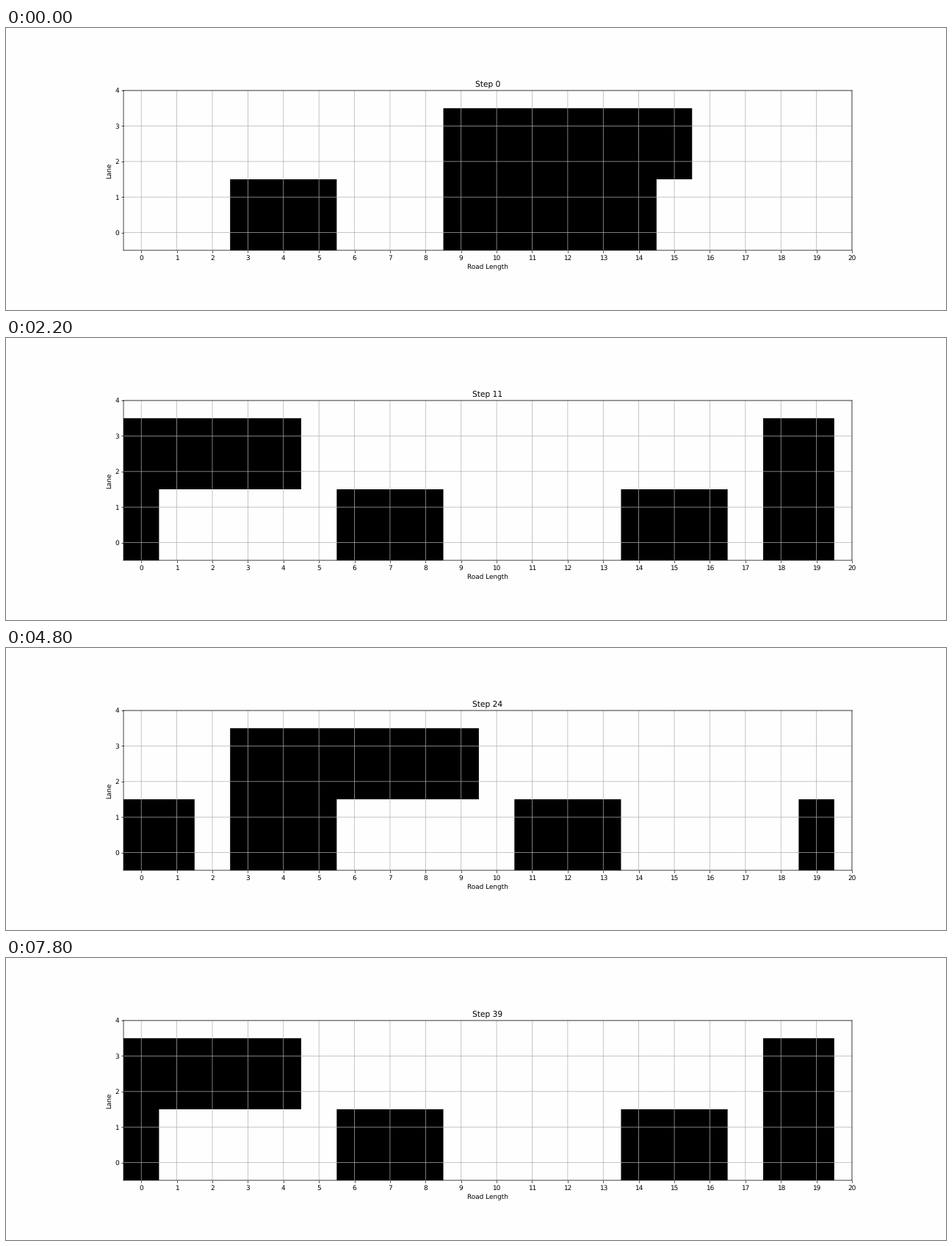
Recreate the animation shown at these times as a matplotlib script. Size 1280x384 px, loop 8000 ms.

```python
import numpy as np
import matplotlib.pyplot as plt
from matplotlib.animation import FuncAnimation
from matplotlib.patches import PathPatch
from matplotlib.path import Path

ROAD, LANES = 20, 4
STEPS, INTERVAL = 40, 200
V_MAX = 5
PAPER = "#fefefe"
CELL = np.array([(0, 0), (1, 0), (1, 1), (0, 1), (0, 0)]) - 0.5

# Each track is a two-lane strip: (lowest lane, [(start cell, length, speed), ...])
TRACKS = [
    (0, [(3, 3, 3), (9, 3, 1), (12, 3, 3)]),
    (2, [(9, 7, 1)]),
]


def advance(cars):
    """Speed up by one, but never run into the car ahead on the ring road."""
    moved = []
    for i, (pos, length, speed) in enumerate(cars):
        ahead, _, ahead_speed = cars[(i + 1) % len(cars)]
        gap = (ahead - pos - 1) % ROAD + 1 - length
        speed = min(speed + 1, V_MAX, gap + ahead_speed)
        moved.append(((pos + speed) % ROAD, length, speed))
    return moved


def road_at(step):
    """All occupied cells as one path, so neighbours join without a seam."""
    squares = []
    for lane, cars in TRACKS:
        for _ in range(step):
            cars = advance(cars)
        for pos, length, _ in cars:
            for k in range(length):
                for row in (lane, lane + 1):
                    corner = ((pos + k) % ROAD, row)
                    squares.append(Path(CELL + corner, closed=True))
    return Path.make_compound_path(*squares)


# Unhinted text and unsnapped lines keep positions exact below one pixel.
plt.rcParams["text.hinting"] = "none"

fig, ax = plt.subplots(figsize=(20, 6), dpi=64, facecolor=PAPER)
ax.set_facecolor(PAPER)
ax.set_aspect("equal")
ax.set_xlim(-0.5, ROAD)
ax.set_ylim(-0.5, LANES)
ax.set_xticks(range(ROAD + 1))
ax.set_yticks(range(LANES + 1))
ax.set_xlabel("Road Length")
ax.set_ylabel("Lane")
ax.grid(True)
title = ax.set_title("Step 0")
traffic = ax.add_patch(PathPatch(road_at(0), facecolor="black", linewidth=0))

fig.canvas.draw()
for artist in ax.findobj():
    artist.set_snap(False)


def update(step):
    traffic.set_path(road_at(step))
    title.set_text(f"Step {step}")
    return traffic, title


anim = FuncAnimation(fig, update, frames=STEPS, interval=INTERVAL,
                     repeat=True, repeat_delay=0, blit=False)
plt.show()
```
